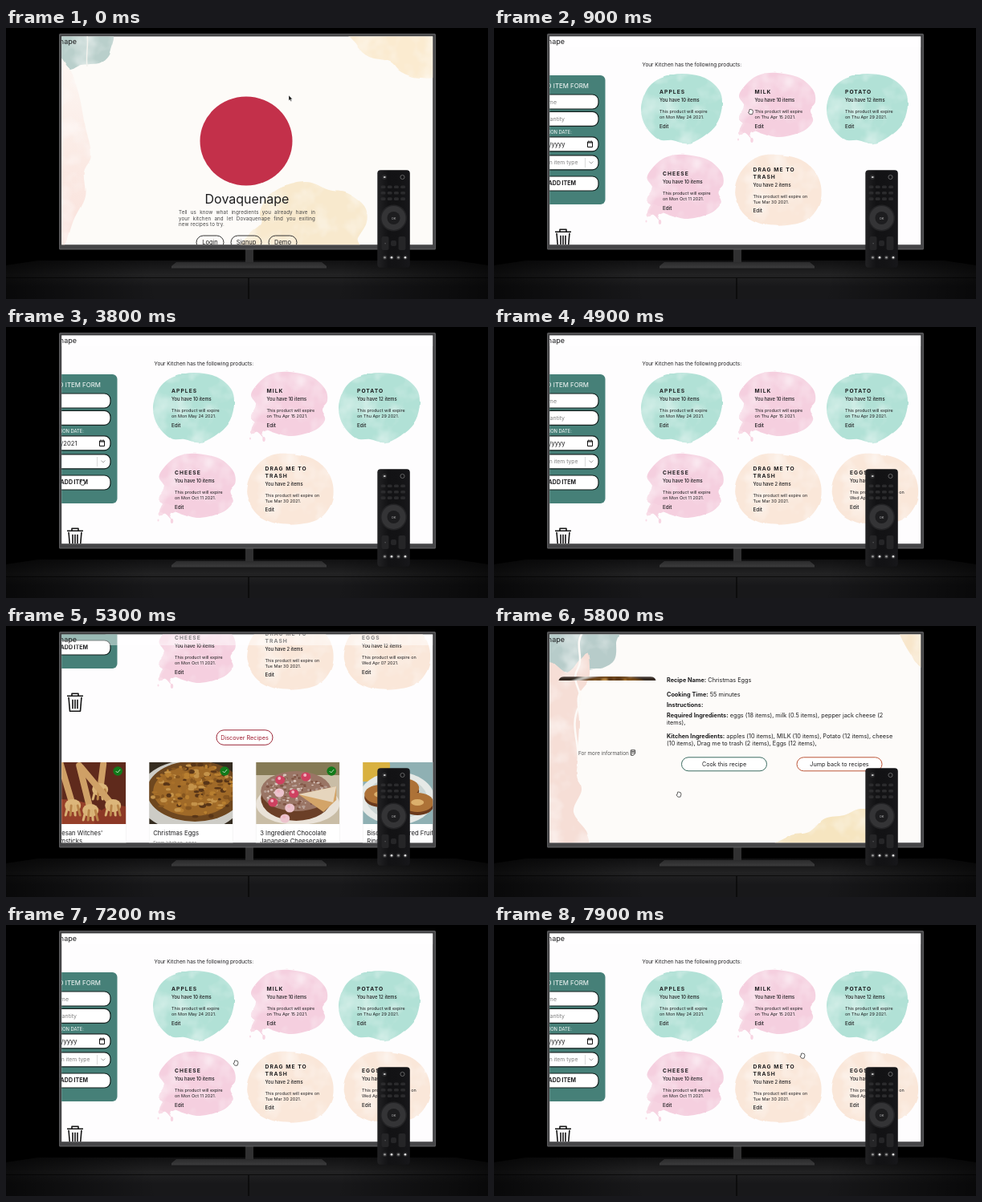
An HTML page that plays this animation: 600 by 338 pixels, repeating every 8 s.

```html
<!DOCTYPE html>
<html lang="en">
<meta charset="utf-8">
<title>Kitchen app on a television</title>
<style>
  html, body { margin: 0; width: 100%; height: 100%; overflow: hidden; background: #000; }
  svg { display: block; }
  #stage { width: 100vw; height: 100vh; }
  text, .intro { font-family: Inter, "Open Sans", sans-serif; fill: #1d1d1f; }
  .intro div { font-size: 6.2px; line-height: 7.5px; letter-spacing: .15px; color: #444; white-space: nowrap; text-align-last: justify; }
  .intro div:last-child { text-align-last: left; }
</style>
<svg id="stage" viewBox="0 0 600 338"></svg>
<script>
const stage = document.getElementById('stage');
const brand = 'Dovaquenape';

const text = (x, y, size, str, attrs = '') =>
  `<text x="${x}" y="${y}" font-size="${size}" ${attrs}>${str}</text>`;
const rect = (x, y, w, h, fill, r = 0, attrs = '') =>
  `<rect x="${x}" y="${y}" width="${w}" height="${h}" rx="${r}" fill="${fill}" ${attrs}/>`;
const oval = (x, y, rx, ry, fill, attrs = '') =>
  `<ellipse cx="${x}" cy="${y}" rx="${rx}" ry="${ry}" fill="${fill}" ${attrs}/>`;
const line = (d, color, w, attrs = '') =>
  `<path d="${d}" fill="none" stroke="${color}" stroke-width="${w}" ${attrs}/>`;
const group = (id, body, attrs = '') => `<g id="${id}" ${attrs}>${body}</g>`;
const shift = (x, y, body) => `<g transform="translate(${x} ${y})">${body}</g>`;
const range = n => [...Array(n).keys()];
const middle = 'text-anchor="middle"', end = 'text-anchor="end"';

// Closed smooth curve through "x,y x,y ..."
function blob(points, fill, attrs = 'filter="url(#wash)"') {
  const p = points.split(' ').map(s => s.split(',').map(Number));
  const at = i => p[(i + p.length) % p.length];
  const curve = p.map((a, i) => {
    const before = at(i - 1), b = at(i + 1), after = at(i + 2);
    const c1 = a.map((v, k) => v + (b[k] - before[k]) / 6);
    const c2 = b.map((v, k) => v - (after[k] - a[k]) / 6);
    return `C${c1} ${c2} ${b}`;
  });
  return `<path d="M${p[0]}${curve.join('')}Z" fill="${fill}" ${attrs}/>`;
}

let seed = 7;
const random = () => (seed = seed * 16807 % 2147483647) / 2147483647;
const specks = (n, x, y, rx, ry, colors, size) => range(n).map(i => {
  const a = random() * 6.283, d = Math.sqrt(random());
  return oval(x + rx * d * Math.cos(a), y + ry * d * Math.sin(a), size * (.5 + random()), size * (.4 + random() * .6), colors[i % colors.length]);
}).join('');

const fade = (id, dir, ...stops) => `<linearGradient id="${id}" ${dir}>` +
  stops.map((c, i) => `<stop offset="${i / (stops.length - 1)}" stop-color="${c}"/>`).join('') + '</linearGradient>';
const down = 'x2="0" y2="1"';

// Room and television
const defs = `<defs>
  <filter id="wash" color-interpolation-filters="sRGB" x="-10%" y="-10%" width="120%" height="120%">
    <feTurbulence type="fractalNoise" baseFrequency=".035" numOctaves="3" seed="4" result="n"/>
    <feDisplacementMap in="SourceGraphic" in2="n" scale="3" xChannelSelector="R" yChannelSelector="G" result="d"/>
    <feColorMatrix in="n" values="0 0 0 0 1 0 0 0 0 1 0 0 0 0 1 1.2 0 0 0 -.52"/>
    <feComposite in2="d" operator="in" result="light"/>
    <feMerge><feMergeNode in="d"/><feMergeNode in="light"/></feMerge>
  </filter>
  <filter id="soft"><feGaussianBlur stdDeviation=".7"/></filter>
  <clipPath id="screen">${rect(69.2, 10.6, 462, 259.6, '#fff')}</clipPath>` +
  fade('wood', down, '#111112', '#222223') +
  fade('front', down, '#232324', '#18181a', '#18181a') +
  fade('foot', down, '#2b2b2c', '#3b3b3c') +
  fade('body', '', '#222224', '#121214', '#131315', '#17171a') +
  fade('blush', down, '#fdf7f3', '#fbeae4', '#fae0da') +
  `<radialGradient id="dark" gradientUnits="userSpaceOnUse" cx="300" cy="300" r="330">
    <stop offset=".35" stop-opacity="0"/><stop offset="1" stop-opacity=".75"/></radialGradient>
</defs>`;

const room = rect(0, 0, 600, 338, '#000') +
  '<path d="M0 296L40 290H560L600 296V308H0Z" fill="url(#wood)"/>' +
  rect(0, 307, 600, 31, 'url(#front)') + line('M0 311.5H600', '#0c0c0c', 1) + line('M302 312V338', '#050505', 1.2) +
  rect(0, 288, 600, 50, 'url(#dark)') +
  rect(298, 275, 10, 18, '#303031') +
  '<path d="M212 292H393L399 297V299.5H206V297Z" fill="url(#foot)"/>' +
  rect(66, 7, 469, 269.5, '#59595b', 1.5) + rect(67.5, 8.5, 466, 263, '#3d3d3f') +
  rect(67, 270.2, 467, 5, '#454547');

const remote = rect(462.3, 177.3, 40.5, 121.5, 'url(#body)', 4) +
  oval(471, 186, 3, 3, '#2c2c2e') + rect(470, 185, 2.5, 2, '#bbb', .5) +
  oval(493.5, 186, 2.6, 2.6, 'none', 'stroke="#777" stroke-width=".8"') +
  range(12).map(i => rect(466.5 + i % 4 * 8.2, 196.5 + (i >> 2) * 7.4, 6, 3.6, '#2b2b2d', 1.5)).join('') +
  oval(482.5, 237, 16.5, 16.5, '#232325') + oval(482.5, 237, 15, 15, '#343436') +
  oval(482.5, 237, 8, 8, '#1d1d1f') + text(482.5, 238.6, 4, 'OK', middle + ' style="fill:#bbb"') +
  rect(467.5, 260, 9, 17, '#252527', 2) + rect(488.5, 260, 9, 17, '#252527', 2) +
  rect(479, 265, 7, 7, '#252527', 2) + text(472, 270, 4, '+', middle + ' style="fill:#777"') +
  [471.5, 480, 488.5, 497].map((x, i) => oval(x, 286.3, 2.7, 2.7, '#303032') + oval(x, 286.3, 1.3, 1.3, i % 2 ? '#eee' : '#999')).join('');

// Landing page
const pill = (x, y, w, h, color, label, size, fill = 'none') =>
  rect(x, y, w, h, fill, h / 2, `stroke="${color}" stroke-width="1"`) +
  text(x + w / 2, y + h / 2 + size * .36, size, label, middle);

const home = rect(69, 10, 463, 261, '#fdfbf8') +
  blob('60,0 128,0 130,28 118,43 94,46 80,52 60,50', '#b9cfcb') +
  line('M101 8C103 22 99 34 101 48', '#f3f3ee', 1.5) +
  blob('60,55 78,50 90,80 98,120 106,158 97,180 98,210 84,240 72,275 60,275', 'url(#blush)') +
  blob('432,0 437,22 452,36 478,42 492,55 515,62 545,55 545,0', '#fbebd0') +
  blob('300,280 303,258 318,243 316,230 325,212 345,198 375,192 402,202 425,206 446,222 449,242 438,262 430,280', '#f8e9cd') +
  oval(299, 141, 57.5, 55.5, '#c3304a') +
  text(300, 219, 16, brand, middle) +
  `<foreignObject x="215" y="226" width="170" height="26"><div class="intro">
    <div>Tell us know what ingredients you already have in</div><div>your kitchen and let ${brand} find you exiting</div><div>new recipes to try.</div>
  </div></foreignObject>` +
  pill(237, 259, 34, 17, '#333', 'Login', 7.5) + pill(280, 259, 38, 17, '#333', 'Signup', 7.5) + pill(327, 259, 35, 17, '#333', 'Demo', 7.5);

// Kitchen page
const green = '196,70 212,61 235,57 262,62 280,77 284,95 279,116 265,132 243,144 222,140 205,139 189,123 183,103 187,84';
const pink = '317,67 332,58 352,56 380,62 397,77 400,92 393,103 397,116 384,129 356,136 334,131 318,124 306,114 312,98 305,84';
const peach = '313,172 330,160 352,158 379,163 398,177 407,197 405,220 390,239 365,246 336,245 313,234 300,212 302,190';
const pinkBlob = blob(pink, '#f5cfdf') +
  blob('311,118 328,125 318,131 321,139 313,131 305,133', '#f6d3e1') +
  oval(307, 131, 3, 2, '#f9dce7') + oval(321, 140, 1.7, 3, '#f7d5e2') + oval(304, 139, 1, 1.5, '#f9dce7');
const peachBlob = blob(peach, '#fae7d9');

// Lines are the title's; "on" wraps to the date row unless wide
function product(x, y, lines, count, date, wide) {
  const rest = y + (lines.length - 1) * 8.7;
  return lines.map((s, i) => text(x, y + i * 8.7, 6.7, s, 'font-weight="700" letter-spacing="1.05"')).join('') +
    text(x, rest + 10.4, 5.8, `You have ${count} items`, 'font-weight="500"') +
    text(x, rest + 24, 5.45, 'This product will expire' + (wide ? ' on' : '')) +
    text(x, rest + 31, 5.45, (wide ? '' : 'on ') + date + ' 2021.') +
    text(x, rest + 42.5, 6.3, 'Edit', 'font-weight="500"');
}

const field = y => rect(30, y, 100, 18, '#fff', 7.5, 'stroke="#14211f" stroke-width="1.2"');
const grey = end + ' style="fill:#808080"';
const form = rect(30, 59, 108.5, 161, '#468078', 6) +
  text(118, 75, 7.9, 'ADD ITEM FORM', end + ' style="fill:#fff"') +
  [83, 104.3, 135.8, 158.8, 185].map(field).join('') +
  text(97, 131.5, 5.8, 'EXPIRATION DATE:', end + ' style="fill:#fff"') +
  text(78, 94.5, 7, 'Name', grey + ' id="name"') + text(88, 115.8, 7, 'Quantity', grey + ' id="amount"') +
  text(88.5, 147.5, 7.6, 'mm/dd/yyyy', end + ' id="date"') +
  text(104.5, 170.3, 6.8, 'Select an item type', grey + ' id="kind"') +
  line('M113.5 162V174', '#ccc', .7) + line('M118.5 166.5L121 169L123.5 166.5', '#aaa', 1) +
  line('M116.5 142H122.5V148.5H116.5ZM116.5 143H122.5M118 140.5V142M121 140.5V142', '#111', 1) +
  text(102, 196.2, 7, 'ADD ITEM', end + ' font-weight="700"');

const bin = shift(0, .8, line('M76 253.5H96M82 253V250.5H90V253M78 255L79.5 272.5H92.5L94 255M83 258V269.5M86 258V269.5M89 258V269.5', '#161616', 1.6, 'stroke-linejoin="round"'));

// Dishes, each drawn on a 104 x 77 card picture
const broom = (x1, y1, x, y) => line(`M${x1} ${y1}L${x} ${y}`, '#cfa066', 8, 'stroke-linecap="round"') +
  oval(x, y, 10, 8, '#dcb67a') + range(4).map(k => line(`M${x - 6 + k * 4} ${y}l${k * 2 - 3} 12`, k % 2 ? '#b98549' : '#d8b175', 3, 'stroke-linecap="round"')).join('');
const dishes = [
  rect(0, 0, 104, 77, '#5f2a1c') + oval(20, 72, 60, 26, '#96402a') + oval(95, 74, 30, 20, '#8c3826') +
    broom(22, 0, 38, 54) + broom(46, 4, 60, 60) + broom(76, 2, 72, 34) + broom(48, 6, 88, 54),
  rect(0, 0, 104, 77, '#352c20') + oval(52, 42, 66, 45, '#cdccc6') + oval(57, 36, 60, 38, '#6e471f') + oval(55, 36, 50, 31, '#a06a28') +
    specks(170, 57, 36, 54, 34, ['#b87f30', '#583517', '#c4934a', '#85551f', '#a8702a'], 3),
  rect(0, 0, 104, 77, '#c9bda6') + rect(0, 0, 104, 16, '#857a55') + oval(52, 52, 52, 26, '#e9e2d8') +
    oval(50, 45, 44, 28, '#6b3f27') + oval(50, 36, 44, 25, '#9a7565') +
    specks(150, 50, 36, 40, 22, ['#d9c6be', '#805444', '#b69d93'], 1.6) +
    '<path d="M53 40L100 30V47L84 62Z" fill="#d3a468"/><path d="M53 40L100 30L96 50Z" fill="#e6d5bd"/>' +
    [[29, 38], [47, 39], [62, 18], [36, 70], [21, 50], [30, 22], [42, 57]].map(([x, y], i) => oval(x, y, 6, 5.5, i % 3 ? '#cf4160' : '#ecc3cd') + oval(x - 1, y - 2, 2, 2, '#efb4c0')).join(''),
  rect(0, 0, 104, 77, '#8fb0b3') + oval(4, 4, 30, 20, '#d9b13f') + oval(42, 45, 47, 33, '#e6e9e6') + oval(42, 45, 38, 26, '#cbd5d3') +
    [[22, 40], [50, 32], [38, 54], [68, 50]].map(([x, y]) => oval(x, y + 4, 20, 12, '#6b3a1c') + oval(x, y, 20, 12, '#ad7237') + oval(x, y, 8, 4, '#dcb06c')).join('')
].map(d => `<g filter="url(#soft)">${d}</g>`);
const picture = (i, x, y, w, h) =>
  `<svg x="${x}" y="${y}" width="${w}" height="${h}" viewBox="0 0 104 77" preserveAspectRatio="xMidYMin slice">${dishes[i]}</svg>`;

const titles = [['Parmesan Witches\'', 'Broomsticks'], ['Christmas Eggs'], ['3 Ingredient Chocolate', 'Japanese Cheesecake'], ['Biscuit &amp; Buttered Fruit', 'Rings']];
const cards = titles.map((t, i) => {
  const x = 45.2 + i * 133;
  return rect(x, 337, 104, 130, '#fff', 0, 'stroke="#eee" stroke-width=".6"') + picture(i, x, 337, 104, 77) +
    t.map((s, k) => text(x + 5, 427.8 + k * 10, 7.7, s)).join('') +
    (t[1] ? '' : text(x + 5, 439.5, 6, 'From kitchen: eggs', 'style="fill:#777"')) +
    oval(x + 94, 348, 5.8, 5.8, '#127a1a') + line(`M${x + 91.5} 348l2 2l3.5 -4`, '#cfe6d0', .9);
}).join('');

// Date picker
const days = [['T', 'W', 'T', 'F', 'S'], ...range(6).map(r => range(5).map(c => (r * 7 + c + 1) % 31 + 1))];
const picker = rect(60, 156, 76, 120, '#000', 2, 'opacity=".25" filter="url(#soft)"') + rect(50, 154.5, 84, 122, '#fff', 1.5) +
  text(73, 166.3, 5.2, 'March 2021', end + ' font-weight="600"') + '<path d="M74.5 163.5H78L76.2 165.7Z"/>' +
  line('M109.5 168.5V161.5M106.5 164.5L109.5 161.5L112.5 164.5M123 161.5V168.5M120 165.5L123 168.5L126 165.5', '#444', .8) +
  rect(93, 222, 12, 12, '#1a62e0') + rect(93, 246, 12, 12, '#b9d6d1') +
  days.map((row, r) => row.map((d, c) => text(75 + c * 11.9, 182 + r * 12, 5.2, d,
    `${middle} style="fill:${r == 4 && c == 2 ? '#fff' : r > 4 && d < 20 ? '#888' : '#222'}"`)).join('')).join('') +
  text(117, 267.3, 5.8, 'Today', middle + ' style="fill:#23877b"');

const kitchen = rect(69, 10, 463, 600, '#fefdfe') +
  group('scroll',
    text(184.5, 48, 6.47, 'Your Kitchen has the following products:') +
    blob(green, '#b1e1d6') + shift(231, 0, blob(green, '#b1e1d6')) + pinkBlob + shift(-114.5, 102, pinkBlob) + peachBlob +
    product(206, 82, ['APPLES'], 10, 'Mon May 24') + product(324.5, 82, ['MILK'], 10, 'Thu Apr 15') +
    product(437, 82, ['POTATO'], 12, 'Thu Apr 29') + product(210, 184, ['CHEESE'], 10, 'Mon Oct 11') +
    product(322.5, 179.2, ['DRAG ME TO', 'TRASH'], 2, 'Tue Mar 30', true) +
    group('eggs', shift(120.5, 0, peachBlob) + product(443, 184, ['EGGS'], 12, 'Wed Apr 07', true)) +
    form + bin + rect(262, 296.8, 70, 18.5, '#fff', 9.2, 'stroke="#9c2637" stroke-width="1"') +
    text(297, 308.5, 7.3, 'Discover Recipes', middle + ' style="fill:#a02034"') + cards + group('picker', picker)) +
  rect(69, 10, 463, 14, '#fff', 0, 'opacity=".45"');

// Recipe page
const entry = (y, label, value) => text(215, y, 7.3, `<tspan font-weight="700">${label}</tspan> ${value}`);
const recipe = rect(69, 10, 463, 261, '#fdfbf9') +
  blob('60,0 148,0 152,22 150,42 136,52 118,54 104,62 88,57 60,58', '#b7ccca') +
  blob('60,62 92,58 106,44 116,34 119,50 117,68 104,88 106,120 104,158 103,186 108,205 98,232 116,258 114,280 60,280', '#f6ded6') +
  line('M112 6C98 22 113 38 104 54C94 70 113 80 106 100C92 126 110 150 104 182', '#fdfaf7', 2.5) +
  blob('506,0 509,18 519,36 527,48 545,54 545,0', '#f8e6cb') +
  blob('352,280 368,262 392,257 412,240 436,236 456,228 482,233 496,246 490,262 494,280', '#f6e5c0') +
  '<clipPath id="frame"><rect id="loaded" x="80" y="63" width="122" height="5"/></clipPath>' +
  `<clipPath id="round">${rect(80, 63, 122, 86, '#fff', 7)}</clipPath>` +
  `<g clip-path="url(#frame)"><g clip-path="url(#round)">${picture(1, 80, 63, 122, 86)}</g></g>` +
  text(105, 161, 6.36, 'For more information', 'style="fill:#555"') +
  line('M170.5 154.8H175.5V159L173.5 161.2H170.5ZM171.5 156.5H174.5M171.5 158.2H174.5', '#222', .9) +
  entry(70, 'Recipe Name:', 'Christmas Eggs') + entry(87.5, 'Cooking Time:', '55 minutes') + entry(100.7, 'Instructions:', '') +
  entry(113.8, 'Required Ingredients:', 'eggs (18 items), milk (0.5 items), pepper jack cheese (2') + text(215, 122.7, 7.3, 'items),') +
  entry(140, 'Kitchen Ingredients:', 'apples (10 items), MILK (10 items), Potato (12 items), cheese') +
  text(215, 149, 7.3, '(10 items), Drag me to trash (2 items), Eggs (12 items),') +
  pill(233.5, 163.8, 106, 17, '#3c6d62', 'Cook this recipe', 7.2, '#fff') + pill(377, 163.8, 106, 17, '#bd5638', 'Jump back to recipes', 7.2, '#fff');

const cursors = {
  arrow: '<path d="M0 0V6.5L1.5 5.2L2.6 7.5L3.6 7L2.6 4.8H4.5Z" fill="#111" stroke="#fff" stroke-width=".4"/>',
  hand: '<path d="M-1.5 -2.8L0 -3L2.4 -2.2L3 0L2 3.2H-1.2L-3 .6L-1.8 0Z" fill="#fff" stroke="#222" stroke-width=".7"/>',
  beam: line('M-1.3 -2.8Q0 -2.8 0 -2V2Q0 2.8 -1.3 2.8M1.3 -2.8Q0 -2.8 0 -2M0 2Q0 2.8 1.3 2.8', '#222', .8)
};

stage.innerHTML = defs + room +
  group('view', group('home', home) + group('kitchen', kitchen) + group('recipe', recipe) +
    text(88, 20, 9, brand, end) +
    group('cursor', Object.entries(cursors).map(([id, c]) => group(id, c)).join('')), 'clip-path="url(#screen)"') + remote;

// Pointer path: time, x, y, shape
const path = [
  [0, 352, 84, 'arrow'], [400, 345, 266, 'hand'], [500, 345, 264, 'hand'], [900, 319.5, 104.5, 'hand'], [1300, 92, 92, 'beam'],
  [1800, 92, 92, 'beam'], [2000, 96, 113, 'beam'], [2300, 119, 145, 'arrow'], [2500, 119, 145, 'arrow'], [2800, 96.5, 251.5, 'arrow'],
  [3100, 96.5, 251.5, 'arrow'], [3400, 112, 168, 'hand'], [3700, 95, 194, 'hand'], [4100, 95, 194, 'hand'], [4400, 55, 200, 'arrow'],
  [5300, 55, 200, 'arrow'], [5700, 230, 215, 'hand'], [5900, 230, 205, 'arrow'], [6400, 227, 125, 'beam'], [6600, 227, 125, 'beam'],
  [6900, 286, 172, 'hand'], [7200, 286, 172, 'hand'], [7900, 384, 163, 'hand'], [8000, 384, 163, 'hand']
];
const clamp = v => Math.min(1, Math.max(0, v));
const ease = v => v * v * (3 - 2 * v);
const el = id => document.getElementById(id);
const show = (id, on) => el(id).setAttribute('display', on ? 'inline' : 'none');

function draw(now) {
  const t = Math.floor(now % 8000 / 100) * 100;
  const page = t < 500 ? 'home' : t >= 5800 && t < 7200 ? 'recipe' : 'kitchen';
  ['home', 'kitchen', 'recipe'].forEach(id => show(id, id == page));

  const filling = t < 4000;
  show('name', !(filling && t >= 1500));
  show('amount', !(filling && t >= 2100));
  show('kind', !(filling && t >= 3500));
  el('date').textContent = filling && t >= 3100 ? '04/08/2021' : 'mm/dd/yyyy';
  show('picker', t >= 2400 && t < 3100);
  show('eggs', t >= 4100);
  const scroll = t < 7200 ? 167 * ease(clamp((t - 4900) / 300)) : 0;
  el('scroll').setAttribute('transform', `translate(0 ${-scroll})`);
  el('loaded').setAttribute('height', t < 6600 ? 5 : 86);

  const i = path.findIndex((p, k) => t >= p[0] && t < path[k + 1][0]);
  const [a, b] = [path[i], path[i + 1]];
  const f = ease((t - a[0]) / (b[0] - a[0]));
  el('cursor').setAttribute('transform', `translate(${a[1] + (b[1] - a[1]) * f} ${a[2] + (b[2] - a[2]) * f})`);
  Object.keys(cursors).forEach(id => show(id, id == a[3]));
}

const start = performance.now();
(function tick() {
  draw(performance.now() - start);
  requestAnimationFrame(tick);
})();
</script>
</html>
```
